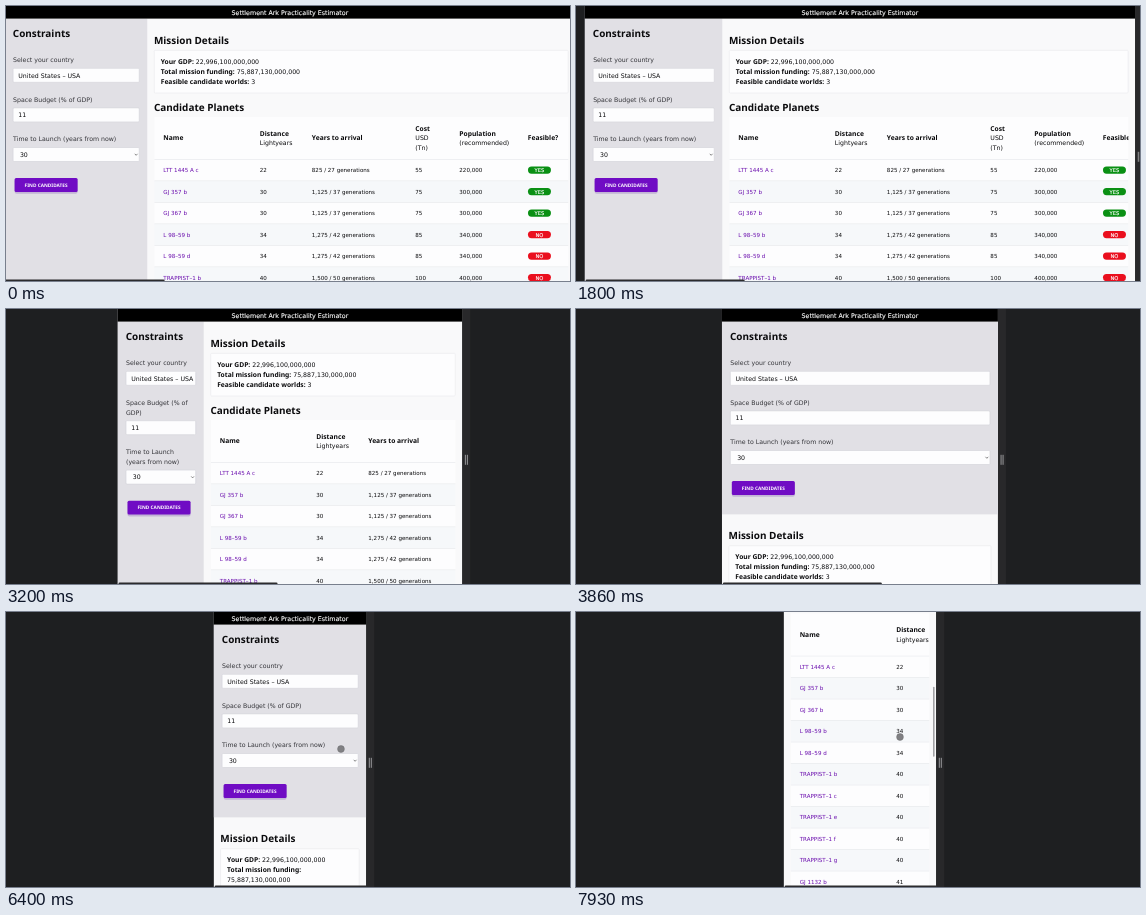
Write an HTML page that moves like this. It is 564 by 275 pixels and loops after 8 s.

```html
<!DOCTYPE html>
<html lang="en">
<head>
<meta charset="utf-8">
<title>Responsive page</title>
<style>
html, body { margin: 0; width: 100%; height: 100%; overflow: hidden; background: #1e1f21; }
svg { display: block; width: 100%; height: 100%; }
text { font: 6.22px "DejaVu Sans", sans-serif; text-rendering: geometricPrecision; white-space: pre; }
.bold { font: 700 6.7px "Noto Sans", sans-serif; }
.head { font: 700 9.95px "Noto Sans", sans-serif; }
.cell { font-size: 5.55px; }
.btn { font: 600 4.75px "Noto Sans", sans-serif; }
.pill { font-size: 5.2px; }
.title { font-size: 6.3px; }
.title, .pill { stroke: #fff; stroke-width: .14px; }
</style>
</head>
<body>
<svg id="stage" viewBox="0 0 564 275"></svg>
<script>
const LOOP = 8000, CENTER = 283.9, LINE = 9.8, ROW = 21.5, BAR = 12.6;
const INK = '#0b0b0d', LABEL = '#333338', LINK = '#6a0dad';
const stage = document.getElementById('stage');

const planets = [
  ['LTT 1445 A c', 22, '825 / 27', 55, '220,000', true],
  ['GJ 357 b', 30, '1,125 / 37', 75, '300,000', true],
  ['GJ 367 b', 30, '1,125 / 37', 75, '300,000', true],
  ...['b', 'd'].map(p => ['L 98–59 ' + p, 34, '1,275 / 42', 85, '340,000', false]),
  ...['b', 'c', 'e', 'f', 'g'].map(p => ['TRAPPIST–1 ' + p, 40, '1,500 / 50', 100, '400,000', false]),
  ...['b', 'c'].map(p => ['GJ 1132 ' + p, 41, '1,537 / 51', 102, '410,000', false])
];
const columns = [
  [0, ['Name']], [96.5, ['Distance', 'Lightyears']], [148.5, ['Years to arrival']],
  [252, ['Cost', 'USD', '(Tn)']], [296, ['Population', '(recommended)']], [364.5, ['Feasible?']]
];

// Keyed positions over time, joined by a monotone cubic
const edgeKeys = [[0, -1.4], [900, -.4], [1500, 3], [1800, 8.6], [2530, 46.6], [2600, 54.5], [3460, 129.5],
  [3860, 145.8], [4330, 162], [5000, 189.7], [5230, 200.6], [5600, 207.6], [8000, 207.6]];
const scrollKeys = [[0, 0], [6450, 0], [6750, 65], [7050, 150], [7350, 232], [7650, 292], [7860, 310.5], [7930, 311.5], [8000, 311.5]];
const cursorX = [[0, 358], [5900, 358], [6400, 335], [6900, 328], [7930, 324], [8000, 324]];
const cursorY = [[0, 149], [5900, 149], [6400, 137], [6900, 131], [7930, 125], [8000, 125]];

function curve(keys, t) {
  const slope = i => (keys[i + 1][1] - keys[i][1]) / (keys[i + 1][0] - keys[i][0]);
  const tangent = i => {
    if (i === 0 || i === keys.length - 1) return 0;
    const a = slope(i - 1), b = slope(i);
    return a * b <= 0 ? 0 : 2 * a * b / (a + b);
  };
  let i = 0;
  while (i < keys.length - 2 && t > keys[i + 1][0]) i++;
  const [t0, a] = keys[i], [t1, b] = keys[i + 1], h = t1 - t0, u = (t - t0) / h;
  const u2 = u * u, u3 = u2 * u;
  return a * (2 * u3 - 3 * u2 + 1) + b * (3 * u2 - 2 * u3) +
    h * (tangent(i) * (u3 - 2 * u2 + u) + tangent(i + 1) * (u3 - u2));
}

const rect = (x, y, w, h, fill, more = '') =>
  `<rect x="${x}" y="${y}" width="${Math.max(0, w)}" height="${Math.max(0, h)}" fill="${fill}" ${more}/>`;
const text = (x, y, s, cls = '', fill = INK, more = '') =>
  `<text x="${x}" y="${y}" class="${cls}" fill="${fill}" ${more}>${s}</text>`;
const middle = 'text-anchor="middle"';
const clip = (id, x, y, w, h) => `<clipPath id="${id}">${rect(x, y, w, h, '#000')}</clipPath>`;

function wrapWords(s, width) {
  const max = width / 3.34, lines = [''];
  for (const word of s.split(' ')) {
    const last = lines.length - 1, joined = (lines[last] + ' ' + word).trim();
    if (joined.length <= max || !lines[last]) lines[last] = joined;
    else lines.push(word);
  }
  return lines;
}

function field(x, y, w, value, select) {
  const r = x + w - 4.5;
  return rect(x, y, w, 14, '#fdfdfe', 'rx="1" stroke="#d2d2d8" stroke-width=".6"') +
    text(x + (select ? 6.8 : 5.2), y + 9.3, value) +
    (select ? `<path d="M${r} ${y + 6.3}l1.4 1.5 1.4-1.5" fill="none" stroke="#555" stroke-width=".7"/>` : '');
}

function constraints(left, width, height) {
  const x = left + 8.5, w = width - 16.5;
  let y = 56.2;
  let out = rect(left, BAR, width, height, '#e1e0e5') + text(x - .3, 31, 'Constraints', 'head');
  for (const [label, value, select] of [
    ['Select your country', 'United States – USA'],
    ['Space Budget (% of GDP)', '11'],
    ['Time to Launch (years from now)', '30', true]
  ]) {
    const lines = wrapWords(label, w);
    lines.forEach((s, i) => { out += text(x, y + i * LINE, s, '', LABEL); });
    y += (lines.length - 1) * LINE;
    out += field(x, y + 6.1, w, value, select);
    y += 39.6;
  }
  return out +
    rect(left + 10, y - 1.7, 63, 14.5, '#9b7fc0', 'rx="2" opacity=".45"') +
    rect(left + 10, y - 2.9, 63, 13.8, '#700cc4', 'rx="1.5"') +
    text(left + 41.5, y + 5.7, 'FIND CANDIDATES', 'btn', '#fff', middle);
}

function mission(left, right, y, wrap) {
  const x = left + 13.5, d = wrap ? LINE : 0;
  const entry = (row, label, value, split) =>
    `<text x="${x}" y="${y + 57.9 + row}" fill="${INK}"><tspan class="bold">${label}</tspan>` +
    (split ? `<tspan x="${x}" dy="${LINE}">${value}</tspan>` : ` ${value}`) + '</text>';
  return text(left + 6.7, y + 37.5, 'Mission Details', 'head') +
    rect(left + 7, y + 44.3, right - left - 14, 42.7 + d, '#fdfdfe', 'rx="1" stroke="#ebebee" stroke-width=".7"') +
    entry(0, 'Your GDP:', '22,996,100,000,000') +
    entry(LINE, 'Total mission funding:', '75,887,130,000,000', wrap) +
    entry(2 * LINE + d, 'Feasible candidate worlds:', '3');
}

function table(left, right, y) {
  const x = left + 16.1, boxX = left + 7, w = right - 6.7 - boxX;
  let out = text(left + 6.7, y + 104.6, 'Candidate Planets', 'head') +
    `<defs>${clip('tableClip', boxX, y + 108, w, 700)}</defs><g clip-path="url(#tableClip)">` +
    rect(boxX, y + 111, w, 42.3, '#fdfdfe');
  for (const [dx, lines] of columns)
    lines.forEach((s, i) => {
      out += text(x + dx, y + 134.4 + (i - (lines.length - 1) / 2) * LINE, s, i ? '' : 'bold');
    });
  planets.forEach(([name, dist, years, cost, people, ok], i) => {
    const c = y + 164.1 + i * ROW, b = c + 2.1;
    out += rect(boxX, c - ROW / 2, w, ROW, i % 2 ? '#f6f8fa' : '#fdfdfe') +
      rect(boxX, c - ROW / 2 - .3, w, .6, '#e6e8eb') +
      text(x, b, name, 'cell', LINK);
    [dist, years + ' generations', cost, people].forEach((s, k) => {
      out += text(x + columns[k + 1][0], b, s, 'cell');
    });
    out += rect(x + 364.6, c - 3.6, 23, 7.2, ok ? '#0a9014' : '#ea0f1e', 'rx="3.6"') +
      text(x + 376.1, c + 1.9, ok ? 'YES' : 'NO', 'pill', '#fff', middle);
  });
  return out + '</g>';
}

function draw(t) {
  const left = curve(edgeKeys, t), right = 2 * CENTER - left, width = right - left;
  const scroll = curve(scrollKeys, t);
  const stacked = width < 307, wrap = width < 168;
  const side = stacked ? width : width / 4;
  const main = stacked ? left : left + side;
  const top = stacked ? 192.4 : 0;

  let out = `<defs>${clip('pageClip', left, 0, width, 275)}</defs>` +
    rect(0, 0, 564, 275, '#1e1f21') +
    rect(right, 0, 8, 275, '#28282a') +
    `<g clip-path="url(#pageClip)">` + rect(left, 0, width, 275, '#f9f9fa') +
    `<g transform="translate(0 ${-scroll})">` +
    constraints(left, side, stacked ? 192.8 : 263) +
    mission(main, right, top, wrap) +
    table(main, right, top + (wrap ? LINE : 0)) +
    rect(left, 0, width, BAR, '#000') +
    text(CENTER, 9, 'Settlement Ark Practicality Estimator', 'title', '#fff', middle) + '</g>';

  if (scroll > .5) out += rect(right - 3.2, scroll * .24, 1.6, 70, '#a2a2a5', 'rx=".8"');
  out += rect(left + 1, 273.4, 159, 4, '#2b2b2d', 'rx="1.2"') + '</g>';

  for (const dx of [3.1, 5.1]) out += rect(right + dx - .5, 145.8, 1, 10, '#98989b');
  if (t > 5900)
    out += `<circle cx="${curve(cursorX, t)}" cy="${curve(cursorY, t)}" r="3.4" fill="#808083" stroke="#6c6c70" stroke-width=".5"/>`;
  stage.innerHTML = out;
}

function tick() {
  draw(performance.now() % LOOP);
  requestAnimationFrame(tick);
}
tick();
</script>
</body>
</html>
```
